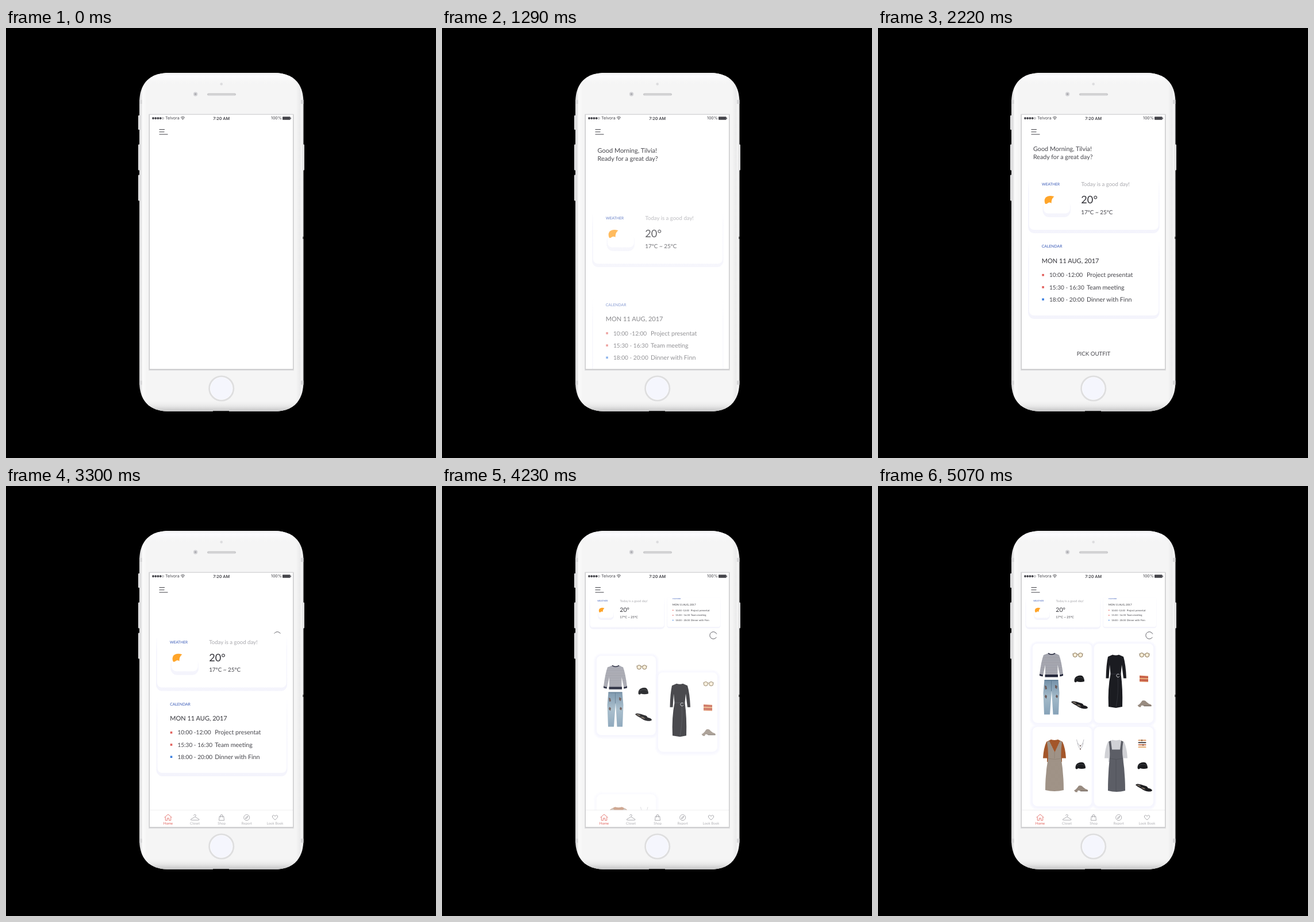
Animation, 748 px wide and 748 px high, one loop 5400 ms. Source, as an HTML page:

```html
<!DOCTYPE html>
<html lang="en">
<head>
<meta charset="utf-8">
<title>Morning outfit app</title>
<style>
html, body { margin: 0; width: 100%; height: 100%; overflow: hidden; background: #000; }
svg { display: block; width: 100vw; height: 100vh; }
text { font-family: Lato, "Open Sans", sans-serif; fill: #45454b; text-rendering: geometricPrecision; white-space: pre; }
.ui text { font-family: Inter, Roboto, sans-serif; }
</style>
</head>
<body>
<svg id="stage" viewBox="0 0 748 748">
  <defs>
    <linearGradient id="body">
      <stop offset="0" stop-color="#d9d9da"/><stop offset=".012" stop-color="#e6e6e7"/>
      <stop offset=".02" stop-color="#fbfbfb"/><stop offset=".045" stop-color="#f5f5f5"/>
      <stop offset=".955" stop-color="#f5f5f5"/><stop offset=".98" stop-color="#eaeaeb"/>
      <stop offset=".988" stop-color="#f7f7f7"/><stop offset="1" stop-color="#dcdcdd"/>
    </linearGradient>
    <linearGradient id="ends" x2="0" y2="1">
      <stop offset="0" stop-color="#f0f0f1"/><stop offset=".01" stop-color="#fcfcff"/>
      <stop offset=".035" stop-color="#f5f5f5" stop-opacity="0"/>
      <stop offset=".965" stop-color="#f5f5f5" stop-opacity="0"/>
      <stop offset=".985" stop-color="#e6e6e6"/><stop offset="1" stop-color="#c4c4c5"/>
    </linearGradient>
    <linearGradient id="shade" x2="0" y2="1">
      <stop offset=".03" stop-color="#f5f5fd" stop-opacity="0"/><stop offset=".3" stop-color="#f6f6fd"/>
      <stop offset="1" stop-color="#f4f4fc"/>
    </linearGradient>
    <linearGradient id="denim" x2="0" y2="1">
      <stop offset="0" stop-color="#7390a8"/><stop offset=".5" stop-color="#a3bac9"/>
      <stop offset="1" stop-color="#86a2b8"/>
    </linearGradient>
    <pattern id="stripes" width="4" height="1.8" patternUnits="userSpaceOnUse">
      <path d="M0 0h4v1.800H0z" fill="#dcdde2"/><path d="M0 .5h4" stroke="#555866" stroke-width=".8"/>
    </pattern>
    <pattern id="check" width="2" height="2" patternUnits="userSpaceOnUse">
      <path d="M0 0h2v2H0z" fill="#b3a699"/><path d="M0 0h1v1H0zM1 1h1v1H1z" fill="#8c7f74"/>
    </pattern>
    <filter id="soft" x="-20%" y="-20%" width="140%" height="140%"><feGaussianBlur stdDeviation="1.6"/></filter>
    <clipPath id="screen"><path d="M250 151h249v442H250z"/></clipPath>
    <clipPath id="feed"><path d="M250 193.500h249V593H250z"/></clipPath>
    <path id="shell" d="M232 130C232 96 250 78 284 78H465.500C499.500 78 517.500 96 517.500 130V615C517.500 649 499.500 667 465.500 667H284C250 667 232 649 232 615Z"/>

    <g id="glasses" fill="#f6ecd6" stroke="#75603f" stroke-width=".9">
      <circle cx="-4.700" r="3.600"/><circle cx="4.700" r="3.600"/>
      <path d="M-1.200-1q1.200-1 2.400 0M-8.300-1.500l-1-.8M8.300-1.500l1-.8" fill="none"/>
    </g>
    <g id="pouch">
      <path d="M-8.500 5Q-9-1-5-3.500Q0-6.500 5-5Q9-2 9 5Q2 7-4 5Q-6.500 8-8.500 5Z" fill="#1b1c1f"/>
      <path d="M-7 .5Q0-4 8 0" fill="none" stroke="#4a4b50" stroke-width=".7"/>
    </g>
    <g id="flats">
      <path id="flat" d="M-14.500-4Q-13-6.500-9-5.500Q-4-5 0-3Q6-2 7 1Q6 3.500 0 3Q-8 2-14.500-4Z" fill="#1d1d20"/>
      <path id="sole" d="M-13-4Q-10-5-7-3.500Q-5-2-5-.5Q-9-1-13-4Z" fill="#756a5f"/>
      <use href="#flat" x="7.500" y="4.500"/><use href="#sole" x="7.500" y="4.500"/>
    </g>
    <g id="mule">
      <path d="M-12 3.500Q-8 2-4-4.500Q1-6.500 4-2Q7 1 11 2Q13 3 12 5H0L-4 3.500-6 4.500V6.500H-9.500Z" fill="#988b80"/>
      <path d="M-1 4.700h13" stroke="#5e544c" stroke-width=".8"/>
    </g>
  </defs>

  <g id="phone">
    <g fill="#e3e3e4">
      <rect x="230" y="152" width="4" height="25" rx="1"/><rect x="230" y="202.500" width="4" height="45" rx="1"/>
      <rect x="230" y="255.500" width="4" height="45" rx="1"/><rect x="515" y="202.500" width="4" height="45" rx="1"/>
    </g>
    <use href="#shell" fill="url(#body)"/><use href="#shell" fill="url(#ends)"/>
    <path d="M232 125h4.500v7H232zM513 125h4.500v7H513zM232 613.500h4.500v7H232zM513 613.500h4.500v7H513z" fill="#d5d5d7"/>
    <path d="M360 666.200h28v.8h-28zM516.500 363h1v4h-1z" fill="#000"/>
    <circle cx="374.700" cy="97.500" r="2.300" fill="#dcdcde"/>
    <circle cx="329.600" cy="115" r="3.700" fill="#d3d3d6"/><circle cx="329.600" cy="115" r="1.700" fill="#aaaab0"/>
    <rect x="350" y="113.500" width="50" height="4" rx="2" fill="#c9c9cb"/><path d="M352 116h46" stroke="#dededf"/>
    <circle cx="374.700" cy="627" r="21" fill="#f5f6fd" stroke="#dededf" stroke-width="3"/>
    <circle cx="374.700" cy="627" r="19.300" fill="none" stroke="#fbfbfd"/>
    <rect x="248" y="149.500" width="253" height="446.500" rx="1" fill="#e0e0e1"/>
    <path d="M249 150.500h251v444H249z" fill="#c9c9cb"/>
    <path d="M250 151h249v442H250z" fill="#fff"/>
  </g>

  <g clip-path="url(#screen)">
    <g id="greeting"></g>
    <g clip-path="url(#feed)">
      <g id="looks"></g>
      <path id="refresh" d="M477.800 257.600A6.200 6.200 0 1 0 477.400 262.900" fill="none" stroke="#55555c" stroke-width=".9"/>
      <g id="weather"></g>
      <g id="calendar"></g>
    </g>
    <g id="pick"></g>
    <g id="nav"></g>
    <path d="M266.500 176.500h9.500M266.500 180.800h9M266.500 185h15" stroke="#45454b" stroke-width="1.100"/>
    <g id="status" class="ui"></g>
  </g>
</svg>
<script>
const $ = id => document.getElementById(id);
const text = (x, y, size, str, more = '') => `<text x="${x}" y="${y}" font-size="${size}" ${more}>${str}</text>`;
const path = (d, fill, more = '') => `<path d="${d}" fill="${fill}" ${more}/>`;
const line = (d, color, width = .7) => path(d, 'none', `stroke="${color}" stroke-width="${width}"`);
const use = (id, x, y) => `<use href="#${id}" x="${x}" y="${y}"/>`;
const rect = (x, y, w, h, r, fill, more = '') =>
  `<rect x="${x}" y="${y}" width="${w}" height="${h}" rx="${r}" fill="${fill}" ${more}/>`;
const mid = 'text-anchor="middle"';

$('status').innerHTML =
  [0, 1, 2, 3, 4].map(i => `<circle cx="${256 + i * 4.2}" cy="157" r="${i < 4 ? 1.9 : 1.6}"
    fill="${i < 4 ? '#45454b' : 'none'}" stroke="#45454b" stroke-width="${i < 4 ? 0 : .5}"/>`).join('') +
  text(277, 159.3, 7.1, 'Telvora') +
  line('M304 156q3.500-3.200 7 0M305.300 157.500q2.200-2 4.400 0', '#45454b', 1) +
  path('M306.300 158.600q1.200-1 2.400 0l-1.200 1.200z', '#45454b') +
  text(374.7, 160, 7.2, '7:20 AM', mid + ' font-weight="600"') +
  text(461, 159.3, 7.1, '100%') +
  rect(481, 154.3, 13.6, 5.4, .8, '#45454b') + rect(495, 155.8, 1, 2.4, .5, '#45454b');

$('greeting').innerHTML = text(0, 0, 10.8, 'Good Morning, Tilvia!') + text(0, 14.2, 10.7, 'Ready for a great day?');

const panel = (top, bottom) =>
  rect(261, top, 228.5, bottom - top + 6, 11, 'url(#shade)') + rect(263, top, 225, bottom - top, 8, '#fff');

$('weather').innerHTML = panel(257, 351) +
  text(285, 273.9, 6.5, 'WEATHER', 'style="fill:#3355b5"') +
  text(353.5, 275.3, 9.6, 'Today is a good day!', 'style="fill:#a9a9ae"') +
  text(353.3, 305.4, 18.2, '20°', 'style="fill:#333339"') +
  text(353.3, 323.5, 9.9, '17°C ~ 25°C') +
  rect(286.5, 300, 48.5, 29, 11, 'url(#shade)') + rect(288, 300, 46, 22.5, 8, '#fff') +
  path('M291 306Q288 300 291.500 295Q297 290 306.500 293.200Q301.500 296.500 301.500 305Q298.500 302.500 295.500 304.500Q293.500 306.500 291 306Z', '#ffa52a');

const event = (y, color, time, what) => rect(285.3, y - 1.7, 3.6, 3.6, 0, color) +
  text(298, y + 3.7, 10.1, time) + text(363, y + 3.7, 10.7, what);

$('calendar').innerHTML = panel(363, 500) +
  text(284.8, 382.3, 6.8, 'CALENDAR', 'style="fill:#3355b5"') +
  text(284.8, 408.8, 11, 'MON 11 AUG, 2017', 'style="fill:#333339"') +
  event(429.6, '#e2605c', '10:00 -12:00', 'Project presentat') +
  event(450.8, '#e2605c', '15:30 - 16:30', 'Team meeting') +
  event(472, '#3d80e0', '18:00 - 20:00', 'Dinner with Finn');

$('pick').innerHTML = text(375, 569.5, 9.7, 'PICK OUTFIT', mid);

const tabs = [
  [282, 'Home', 'M-6.500 0L0-5.500L6.500 0M-4.700-1V5H-1.500V1.200H1.500V5H4.700V-1'],
  [328.7, 'Closet', 'M-2-3.200q0-2 2-2t1.500 2.500L0-1.200L-7 3q-1 1.500 1 1.500H6q2 0 1-1.500L0-1.200'],
  [375, 'Shop', 'M-3.800-2H3.800L4.500 5H-4.500ZM-1.800 0V-3.200Q-1.800-5.200 0-5.200T1.800-3.200V0'],
  [418.7, 'Report', 'M-5 0A5 5 0 1 1 5 0A5 5 0 1 1-5 0M2.300-2.300L.8.800L-2.300 2.300L-.8-.8Z'],
  [468, 'Look Book', 'M0 4.300L-4.200 0Q-5.500-3.800-2.500-4Q-.800-4 0-2Q.800-4 2.500-4Q5.500-3.800 4.200 0Z']
];
$('nav').innerHTML = rect(250, 564, 249, 29, 0, '#fff') + rect(250, 563.5, 249, .8, 0, '#ececee') +
  tabs.map(([x, label, d], i) => {
    const color = i ? '#b2b2b6' : '#e0605a';
    return path(d, 'none', `transform="translate(${x} 576.700)" stroke="${i ? '#98989d' : color}" stroke-width=".8"`) +
      text(x, 588.6, 6.2, label, `${mid} style="fill:${color}"`);
  }).join('');

const looks = [
  // striped sweater and jeans
  path('M296 291Q302 294 308 291L315 294Q319 304 322 328L316.500 330L312.500 311V329H291V311L287 330L281 328Q284 304 288 294Z', 'url(#stripes)') +
  path('M290.500 328h22.500v4.500h-22.500zM281 327l6 1.500-.500 3-5.500-1.500zM322 327l-6 1.500.500 3 5.500-1.500z', '#23263a') +
  line('M296 291Q302 295 308 291', '#23263a', 1.6) +
  path('M289.500 337H313.500L315.500 360L314 397.500H304.500L302 356L299 397.500H289L287.500 360Z', 'url(#denim)') +
  path('M290 347l3 1 1 5-3 1zM308 346l4 2-1 5-3-2zM291 363l3 2-1 5-3-3zM310 363l3 2-1 4-3-2z', '#6b5b5a') +
  line('M289.500 338.500H313.500M301.500 338V357', '#58748b', .8) +
  use('glasses', 347.5, 294) + use('pouch', 350, 335) + use('flats', 350.5, 380),
  // long black dress
  path('M408 293.500Q414 295.500 419 293.500L427 297Q431 310 432 334.500H427L424 311L422.500 327Q426 352 425 384L414 386L401 384Q399.500 352 404.500 327L403 311L401.500 334.500H396.500Q397 310 400 297Z', '#1b1c21') +
  line('M404 327H423M417 330Q419 360 414 385', '#3a3b42') +
  line('M419.500 328A2.700 2.700 0 1 0 420 331', '#c9c9cc', 1) +
  use('glasses', 463.5, 294) +
  path('M455 329.500l15 1v10.500l-15-.500z', '#d9825d') +
  line('M455 332l15 .700M455 337.500l15 .500', '#b9483c', 1.6) +
  line('M455 335h15', '#efc48c', 1) + use('mule', 463.5, 378),
  // rust top under a pinafore
  path('M301 441Q307 443 313 441L321 445Q326 456 327 473.500H320V480H294V473.500H287Q288 456 293 445Z', '#a3562a') +
  path('M294 445L298 443.500L307.500 463L316.500 443.500L320 445Q318 460 318.500 473Q323 500 323 529Q307 533 291 529Q291 500 296 473Q296.500 460 294 445Z', 'url(#check)') +
  line('M296 474Q307 477 318.500 474M307 463V474', '#8b7e72') +
  line('M345.500 441Q347 450 352 451.500Q356.500 450 358 441M347 447Q349 456 352 457Q355 456 357 447', '#a3a3aa') +
  path('M350.800 451h2.400v2h-2.400zM351 456.500h2v2.200h-2z', '#8d7d7a') + use('pouch', 352, 486) + use('mule', 353, 526),
  // pale tee under grey dungarees
  path('M408 441.500Q414 443.500 420 441.500L428 445Q433 456 434 473.500H427V480H401V473.500H394Q395 456 400 445Z', '#d0d1d5') +
  path('M401.500 444.500l3.500-1.500 2 15.500h14l2-15.500 3.500 1.500Q424 460 426 473Q430 500 430 530Q415 534 400 530Q400 500 403 473Q404 460 401.500 444.500Z', '#5c5e66') +
  line('M403 474Q414 477 426 474M414 476V530', '#4d4f57') +
  ['#d98a4e', '#2d2b2d', '#c9714a', '#e2a25f'].map((c, i) => rect(452.5, 441.5 + i * 3.9, 14, 1.8, .9, c)).join('') +
  line('M459 441v3M461 449v3', '#5b4636', 1.2) + use('pouch', 460, 486) + use('flats', 462.5, 524)
];
$('looks').innerHTML = looks.map((clothes, i) => {
  const x = 269 + i % 2 * 107, y = 274 + (i >> 1) * 145;
  return '<g>' + rect(x - 4, y - 3, 111, 146, 12, '#f6f6fe', 'filter="url(#soft)"') +
    rect(x, y, 103, 138, 8, '#fff') + clothes + '</g>';
}).join('');

const LOOP = 5400, TRAVEL = 240, SWITCH = 3300;
const lookStarts = [3732, 3865, 4040, 4217];

// eased progress 0..1, cubic out
const ease = (t, start, length = 900) => 1 - (1 - Math.min(1, Math.max(0, (t - start) / length))) ** 3;
const mix = (a, b, p) => a + (b - a) * p;

function place(node, x, y, scale, opacity) {
  node.setAttribute('transform', `translate(${x} ${y}) scale(${scale})`);
  node.setAttribute('opacity', opacity);
}

function rise(node, t, start) {
  const p = ease(t, start);
  place(node, 0, TRAVEL * (1 - p), 1, p);
}

function placeCard(node, t, start, x, y, scale) {
  if (t < SWITCH) return rise(node, t, start);
  const p = ease(t, SWITCH, 800);
  place(node, x * p, y * p, mix(1, scale, p), 1);
}

function draw(t) {
  const second = t >= SWITCH;
  const enter = ease(t, 75, 540), shrink = ease(t, 655);
  place($('greeting'), mix(291.5, 270, shrink), mix(325, 214, shrink) + 95 * (1 - enter),
    mix(1.637, 1, shrink), second ? 0 : enter);
  placeCard($('weather'), t, 955, 106.9, 44.4, .573);
  placeCard($('calendar'), t, 1066, 284.3, 40.4, .409);
  rise($('pick'), t, 1200);
  if (second) $('pick').setAttribute('opacity', 0);
  $('nav').setAttribute('opacity', +second);
  $('refresh').setAttribute('opacity', +second);
  [...$('looks').children].forEach((look, i) => rise(look, t, lookStarts[i]));
}

const begin = performance.now();
function tick() {
  draw((performance.now() - begin) % LOOP);
  requestAnimationFrame(tick);
}
tick();
</script>
</body>
</html>
```
